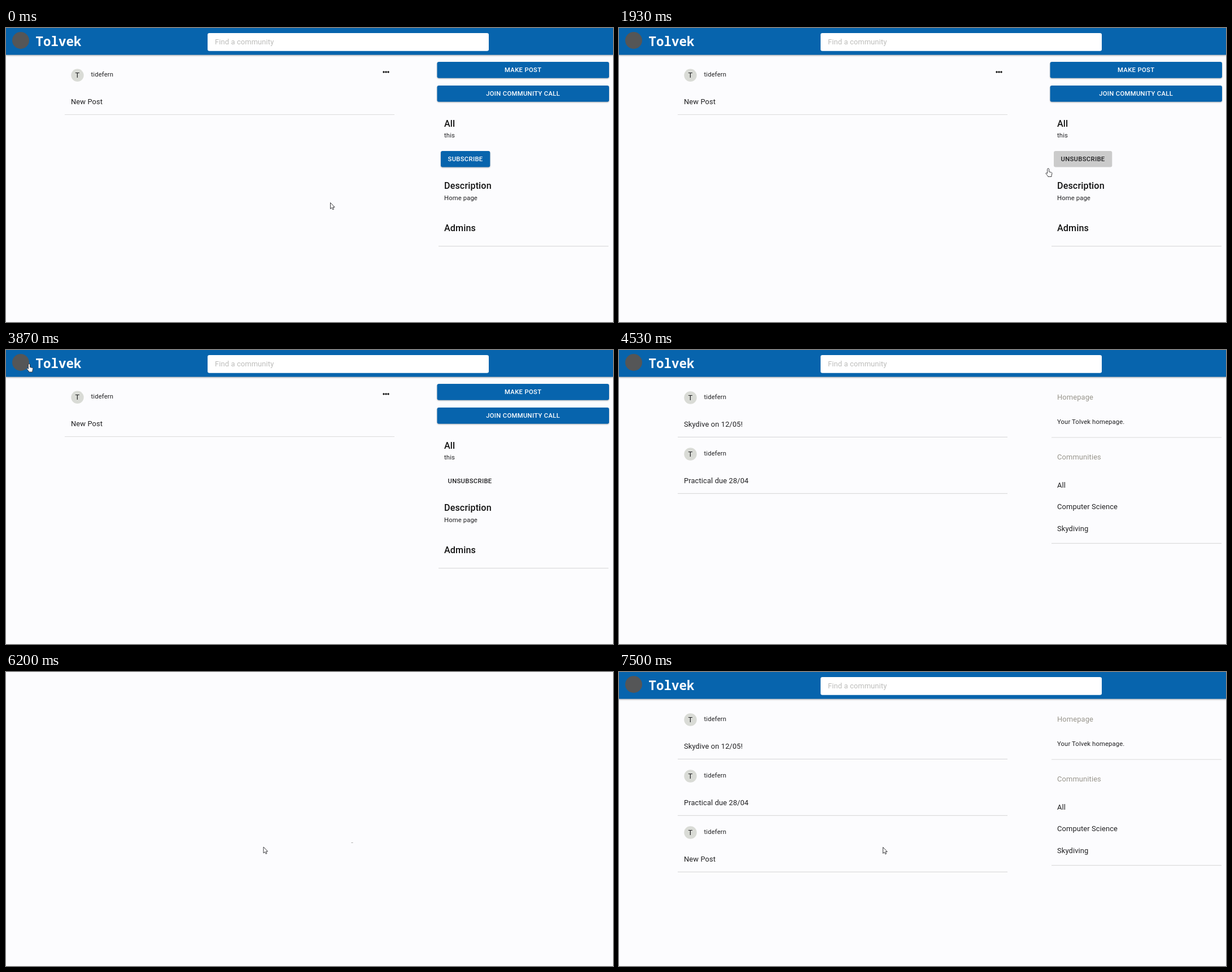
Recreate the animation shown at these times as an HTML page. Size 1075 by 521 pixels, loop 7.53 s.

```html
<!DOCTYPE html>
<html lang="en">
<head>
<meta charset="utf-8">
<title>Community page</title>
<style>
  html, body { margin: 0; width: 100%; height: 100%; overflow: hidden; background: #fcfcfe; }
  svg { display: block; width: 1075px; height: 521px; font-family: Roboto, Arial, sans-serif; fill: #202022; }
  .body { font-size: 12.9px; letter-spacing: .00938em; }
  .small { font-size: 11.28px; letter-spacing: .01071em; }
  .head { font-size: 16.12px; letter-spacing: .0075em; font-weight: 500; fill: #111; }
  .label { font-size: 11.28px; letter-spacing: .02857em; font-weight: 500; }
  .brand { font: 700 22.5px "Noto Sans Mono", "DejaVu Sans Mono", monospace; fill: #fff; }
  .mid { text-anchor: middle; }
  .light { fill: #fff; }
  .muted { fill: #98958c; }
  .hint { fill: #bcbcba; }
  .rule { stroke: #dcdcdc; stroke-width: 1.2; }
  .raised { filter: drop-shadow(0 1px 1px rgba(0, 0, 0, .3)); }
  .bar { filter: drop-shadow(0 1.5px 1.5px rgba(0, 0, 0, .35)); }
  .pointer { fill: #fff; stroke: #3c3c40; stroke-width: 1; stroke-linejoin: round; }
</style>
</head>
<body>
<svg id="stage" viewBox="0 0 1075 521"></svg>
<script>
const LOOP = 7530;
const BLUE = '#0764ad';
const USER = 'tidefern';

const text = (x, y, cls, s) => `<text x="${x}" y="${y}" class="${cls}">${s}</text>`;
const rule = (x1, x2, y) => `<line class="rule" x1="${x1}" x2="${x2}" y1="${y}" y2="${y}"/>`;
const box = (x, y, w, h, fill, cls = '') =>
  `<rect x="${x}" y="${y}" width="${w}" height="${h}" rx="3.2" fill="${fill}" class="${cls}"/>`;
const group = (id, ...parts) => `<g id="${id}">${parts.join('')}</g>`;
const wideButton = (y, s) =>
  box(763.5, y, 304.5, 28.8, BLUE, 'raised') + text(915.7, y + 18, 'label mid light', s);

// Posts on the two pages differ slightly in their inner spacing.
const post = (y, title, nameY, titleY, ruleY) =>
  `<circle cx="126.5" cy="${y}" r="11.2" fill="#d9dbd6"/>` +
  text(126.5, y + 4.3, 'body mid', USER[0].toUpperCase()) +
  text(150.5, y + nameY, 'small', USER) +
  text(115, y + titleY, 'body', title) +
  rule(104, 688, y + ruleY);
const homePost = (i, title) => post(84.5 + 100 * i, title, 2.4, 51.4, 69.8);

const dots = [669, 673, 677]
  .map(x => `<circle cx="${x}" cy="78" r="1.75" fill="#111"/>`).join('');

document.getElementById('stage').innerHTML =
  group('community',
    post(83.8, 'New Post', 1.8, 51.4, 69.7), dots,
    wideButton(60, 'MAKE POST'),
    wideButton(102, 'JOIN COMMUNITY CALL'),
    text(776, 175, 'head', 'All'),
    text(776, 194.3, 'small', 'this'),
    group('subscribe',
      box(770, 218, 87.3, 28.5, BLUE, 'raised'),
      text(782.5, 235.8, 'label light', 'SUBSCRIBE')),
    group('unsubscribe',
      `<g id="hover">${box(770, 218, 103.3, 28.5, '#cbcbcb')}</g>`,
      text(782.5, 235.8, 'label', 'UNSUBSCRIBE')),
    text(776, 285.3, 'head', 'Description'),
    text(776, 304.5, 'small', 'Home page'),
    text(776, 360, 'head', 'Admins'),
    rule(766, 1067, 386.7)) +
  group('home',
    homePost(0, 'Skydive on 12/05!'),
    homePost(1, 'Practical due 28/04'),
    group('newPost', homePost(2, 'New Post')),
    text(776, 87.6, 'body muted', 'Homepage'),
    text(776, 131.4, 'small', 'Your Tolvek homepage.'),
    rule(766, 1067, 155),
    text(776, 194.4, 'body muted', 'Communities'),
    text(776, 243.5, 'body', 'All'),
    text(776, 282, 'body', 'Computer Science'),
    text(776, 320.6, 'body', 'Skydiving'),
    rule(766, 1067, 342.6)) +
  group('header',
    `<rect width="1075" height="47.6" fill="${BLUE}" class="bar"/>`,
    '<circle cx="26" cy="22" r="15" fill="#555657"/>',
    text(52.5, 32, 'brand', 'Tolvek'),
    box(357, 9, 498, 31.8, '#fff'),
    text(370, 29, 'body hint', 'Find a community')) +
  group('dash', '<rect x="611.5" y="302" width="3" height="1" fill="#aaa"/>') +
  group('arrow', '<path class="pointer" d="M0 0V11L2.5 8.7 4.2 12.3 6 11.5 4.4 8H7.6Z"/>') +
  group('hand', '<path class="pointer" d="M-1.5 1a1.5 1.5 0 0 1 3 0V5.5l4 .9c1 .3 1.4 1 1.2 2L5.8 12.5V14H-.5V13L-4 8.8c-.6-1 .5-2 1.5-1.2l1 .8Z"/>');

const ease = {
  in: k => k * k,
  out: k => 1 - (1 - k) ** 2,
  both: k => k * k * (3 - 2 * k)
};

// Pointer stops: time, x, y, easing of the move that ends there
const path = [
  [0, 574.5, 309.5, 'both'],
  [350, 574.5, 309.5, 'both'],
  [900, 796.5, 238, 'both'],
  [1800, 796.5, 238, 'both'],
  [1930, 762, 250, 'in'],
  [2700, 41, 25, 'out'],
  [4050, 41, 25, 'both'],
  [4400, 60, -20, 'in'],
  [4900, 440, -18, 'both'],
  [5400, 452, 300, 'both'],
  [6050, 456, 310, 'out'],
  [6220, 456, 310, 'both'],
  [6650, 467.5, 310.5, 'both'],
  [LOOP, 467.5, 310.5, 'both']
];

function pointerAt(t) {
  const i = path.findIndex(p => p[0] > t);
  const [t0, x0, y0] = path[i - 1];
  const [t1, x1, y1, kind] = path[i];
  const k = ease[kind]((t - t0) / (t1 - t0));
  return [x0 + (x1 - x0) * k, y0 + (y1 - y0) * k];
}

const el = id => document.getElementById(id);
const within = (t, a, b) => t >= a && t < b;
const show = (id, on) => { el(id).style.display = on ? '' : 'none'; };

function draw(t) {
  const blank = within(t, 6170, 7000);
  const subscribed = t >= 1250;
  const hand = within(t, 850, 1950) || within(t, 2600, 4100);

  show('community', t < 4000);
  show('home', t >= 4000 && !blank);
  show('newPost', t >= 7000);
  show('header', !blank);
  show('subscribe', !subscribed);
  show('unsubscribe', subscribed);
  el('hover').style.opacity = Math.max(0, Math.min(1, (2200 - t) / 250));
  show('dash', within(t, 6170, 6235));

  const [x, y] = pointerAt(t);
  const id = hand ? 'hand' : 'arrow';
  show('hand', hand);
  show('arrow', !hand && !within(t, 4400, 4900));
  el(id).setAttribute('transform', `translate(${x.toFixed(2)} ${y.toFixed(2)})`);
}

const start = performance.now();
function tick() {
  draw((performance.now() - start) % LOOP);
  requestAnimationFrame(tick);
}
tick();
</script>
</body>
</html>
```
